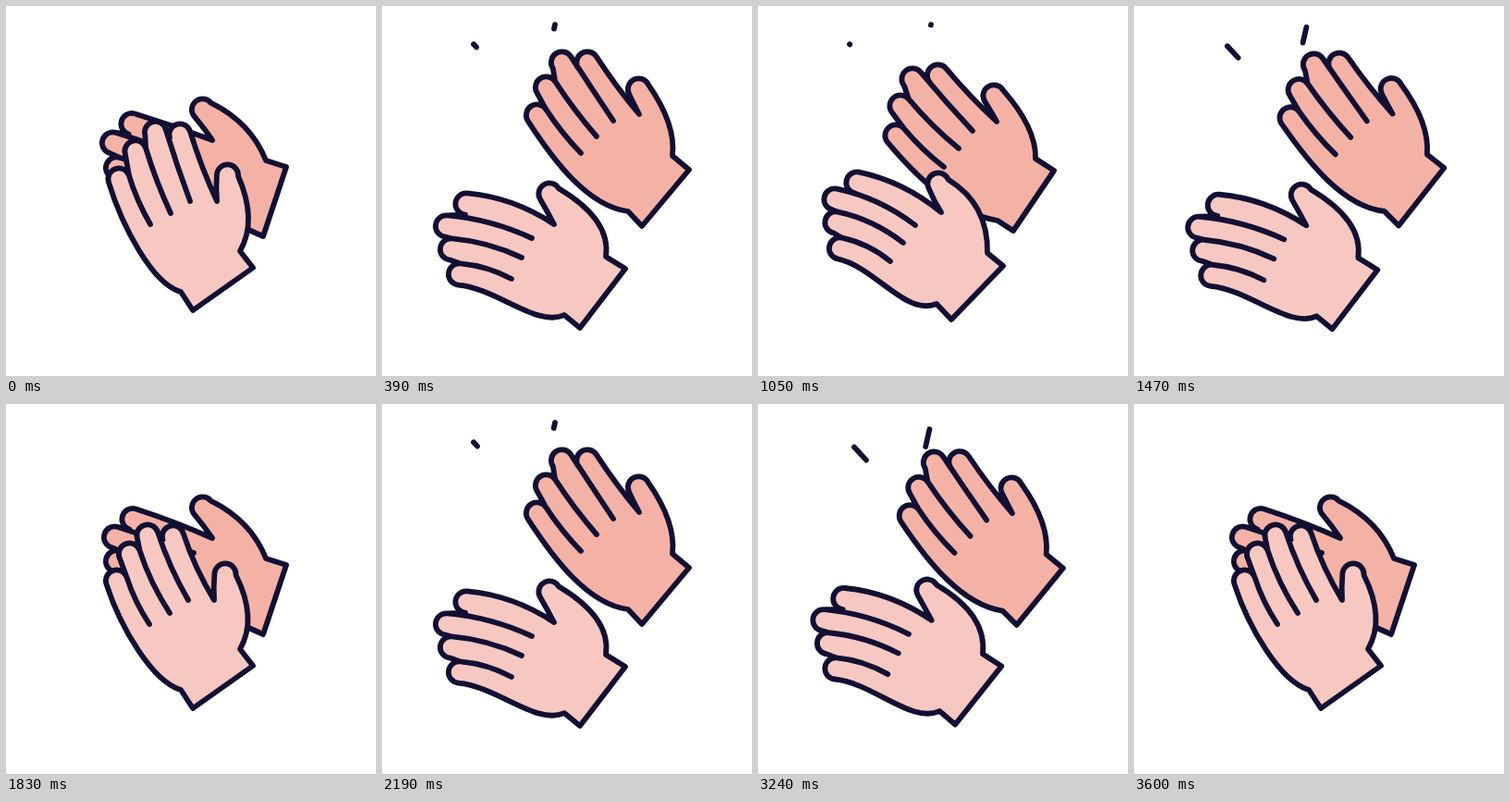
Write an HTML page with a canvas that moves like this. It is 400x400 px and loops after 3.63 s.

```html
<!DOCTYPE html>
<html lang="en">
<head>
<meta charset="utf-8">
<title>Clapping hands</title>
<style>
html, body { margin: 0; width: 100%; height: 100%; overflow: hidden; background: #fff; }
canvas { display: block; }
</style>
</head>
<body>
<canvas id="stage" width="400" height="400"></canvas>
<script>
const ctx = document.getElementById('stage').getContext('2d');
const LOOP = 3630, FRAME = 30, CLAP = LOOP / 6, STEPS = 20;
const INK = '#120f33', TIP = 11.6;

// Pose: thumb angle, finger angle, then points:
// thumb tip, four finger tips, thumb crease, three finger creases,
// heel control, heel, two wrist corners, wrist notch, thumb-side control.
const shift = (pose, dx, dy) => pose.map((v, i) => i < 2 ? v : v + (i % 2 ? dy : dx));
const turn = (pose, deg, cx, cy) => {
  const c = Math.cos(deg * Math.PI / 180), s = Math.sin(deg * Math.PI / 180);
  return pose.map((v, i) => {
    if (i < 2) return v + deg;
    const x = pose[i - i % 2] - cx, y = pose[i - i % 2 + 1] - cy;
    return i % 2 ? cy + s * x + c * y : cx + c * x - s * y;
  });
};

const front = {
  fill: '#f7c8c1',
  open: [60, 5, 181, 203, 91, 214, 69.5, 238, 74.5, 263, 83.5, 290, 186, 236,
    162, 251, 151, 272, 140, 295, 168, 348, 197, 334, 214, 348, 263, 284, 242, 271, 248, 231],
  mid: [68, 12, 195, 192, 107, 191, 83, 209, 84, 234, 88.5, 262, 198, 223,
    170, 237, 157, 256, 143, 276, 160, 336, 193, 322, 209, 339, 265, 281, 248, 267, 249, 214],
  closed: [95, 72, 237, 184, 180.5, 143, 153, 142, 133.5, 162, 119.5, 191, 225, 212,
    197, 212, 177, 226, 155, 238, 158, 300, 189, 309, 202, 329, 267, 283, 253, 265, 272, 232]
};
front.wide = shift(front.open, .3, 1.3);
front.pressed = [95, 73, 239.5, 183, 188, 139, 161.5, 136.5, 140, 157, 122, 187, 228, 211,
  199, 211, 178, 224, 156, 236, ...front.closed.slice(20)];

const back = {
  fill: '#f4b2a7',
  open: [65, 57, 277.5, 90, 222, 61, 194.5, 61, 177.5, 88, 167.5, 118, 278, 117,
    250, 124, 232, 141, 215, 159, 222, 216, 266, 222, 281, 238, 332, 177, 314, 162, 318, 128],
  mid: [58, 50, 255, 97, 194.5, 75, 167, 79, 154, 108, 149, 140, 258, 125,
    232, 135, 217, 154, 201, 174, 212, 224, 259, 232, 276, 243, 320, 178, 300, 165, 301, 132],
  closed: [50, 18, 212.5, 112, 137, 124.5, 117.5, 144, 119.5, 170, 140, 196, 223, 145,
    203, 161, 195, 185, 190, 208, 205, 245, 258, 240, 278, 249, 303, 174, 281, 167, 265, 126]
};
back.wide = turn(back.open, -1.7, 265, 65);
back.pressed = [50, 17, 212.5, 112, 136, 127.5, 115.5, 148, 119.5, 175, 140, 198, 223, 145,
  198, 165, ...back.closed.slice(16)];

const KEYS = [[0, 'pressed'], [1, 'closed'], [5, 'mid'], [7.5, 'open'], [9, 'wide'],
  [10, 'wide'], [13, 'open'], [15, 'mid'], [19, 'closed'], [20, 'pressed']];

// Smooth interpolation through the key poses.
function poseAt(hand, step) {
  let k = 0;
  while (k < KEYS.length - 2 && step >= KEYS[k + 1][0]) k++;
  const last = KEYS.length - 1;
  const time = j => KEYS[j][0], value = (j, i) => hand[KEYS[j][1]][i];
  const slope = (j, i) => j === 0 || j === last ? 0 :
    (value(j + 1, i) - value(j - 1, i)) / (time(j + 1) - time(j - 1));
  const span = time(k + 1) - time(k), s = (step - time(k)) / span;
  return hand.open.map((_, i) => {
    const a = value(k, i), b = value(k + 1, i), ease = s * s * (3 - 2 * s);
    return a + (b - a) * ease +
      span * s * (1 - s) * ((1 - s) * slope(k, i) - s * slope(k + 1, i));
  });
}

function drawHand(hand, step) {
  const pose = poseAt(hand, step);
  const [thumbAngle, angle] = pose.map(v => v * Math.PI / 180);
  const pts = Array.from({ length: 15 }, (_, i) => [pose[2 + i * 2], pose[3 + i * 2]]);
  const [thumb, f1, f2, f3, f4, crotch, e1, e2, e3, heelCtrl, heel, wristA, wristB, notch, sideCtrl] = pts;
  const edge = ([x, y], a, side) => [x + side * TIP * Math.sin(a), y - side * TIP * Math.cos(a)];
  const along = ([x, y], to, a, part) => {
    const d = part * Math.hypot(to[0] - x, to[1] - y);
    return [x + d * Math.cos(a), y + d * Math.sin(a)];
  };
  const cap = ([x, y], a) => ctx.arc(x, y, TIP, a - Math.PI / 2, a + Math.PI / 2, true);

  ctx.beginPath();
  ctx.moveTo(...wristA);
  ctx.lineTo(...wristB);
  ctx.lineTo(...notch);
  ctx.quadraticCurveTo(...sideCtrl, ...edge(thumb, thumbAngle, 1));
  cap(thumb, thumbAngle);
  ctx.quadraticCurveTo(...along(edge(thumb, thumbAngle, -1), crotch, thumbAngle, .5), ...crotch);
  const top = edge(f1, angle, 1), bottom = edge(f4, angle, -1);
  ctx.quadraticCurveTo(...along(top, crotch, angle, .5), ...top);
  for (const tip of [f1, f2, f3, f4]) cap(tip, angle);
  ctx.bezierCurveTo(...along(bottom, heel, angle, .35), ...heelCtrl, ...heel);
  ctx.closePath();
  ctx.fillStyle = hand.fill;
  ctx.fill();

  for (const [tip, end] of [[f2, e1], [f3, e2], [f4, e3]]) {
    const start = edge(tip, angle, 1);
    ctx.moveTo(...start);
    ctx.quadraticCurveTo(...along(start, end, angle, .5), ...end);
  }
  ctx.stroke();
}

function drawSparks(phase) {
  if (phase < 60 || phase > 455) return;
  const left = (from, to, power) =>
    40 * (1 - Math.min(1, Math.max(0, (phase - from) / (to - from)))) ** power;
  const outer = left(60, 330, 2), inner = left(130, 455, 1.36);
  ctx.beginPath();
  for (const [x, y, dx, dy] of [[99, 41.3, .68, .73], [187, 20.2, -.22, .975]]) {
    ctx.moveTo(x + dx * outer, y + dy * outer);
    ctx.lineTo(x + dx * inner, y + dy * inner);
  }
  ctx.stroke();
}

function draw(now) {
  const time = Math.floor(now % LOOP / FRAME) * FRAME;
  const phase = time % CLAP;
  const step = Math.min(STEPS, Math.round(phase / CLAP * STEPS + .3));
  ctx.clearRect(0, 0, 400, 400);
  ctx.strokeStyle = INK;
  ctx.lineWidth = 5.8;
  ctx.lineCap = ctx.lineJoin = 'round';
  drawSparks(phase);
  drawHand(back, step);
  drawHand(front, step);
}

const began = performance.now();
function tick() {
  draw(performance.now() - began);
  requestAnimationFrame(tick);
}
tick();
</script>
</body>
</html>
```
